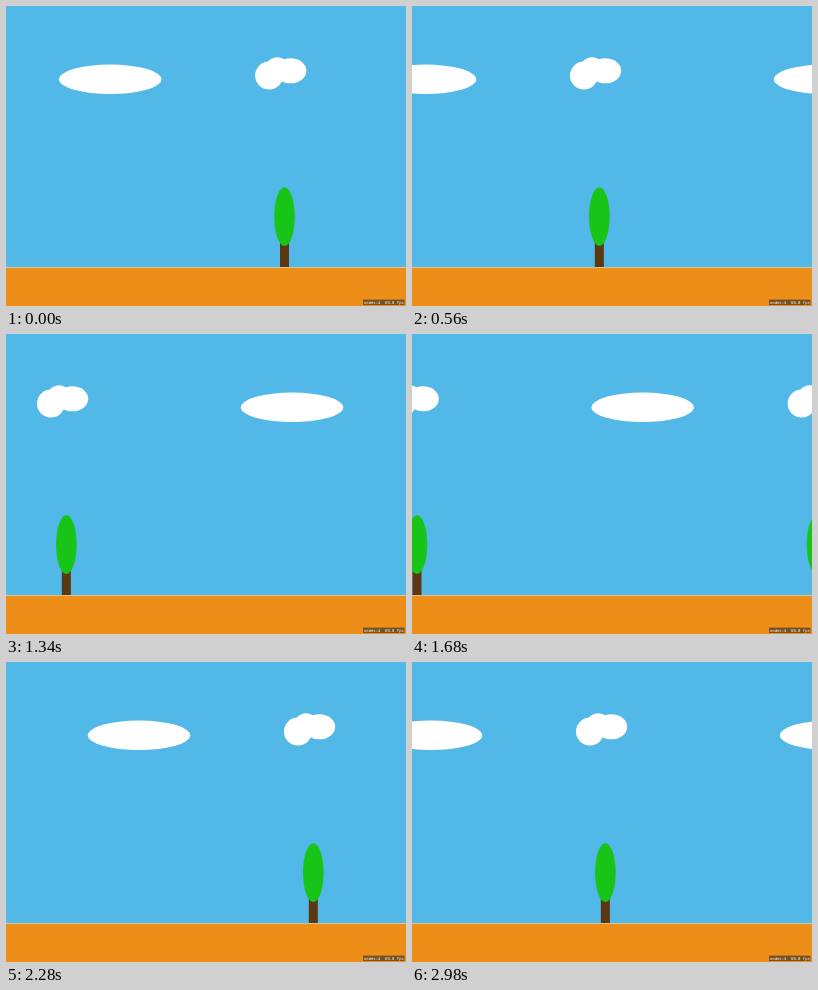
An HTML page with a canvas that plays this animation: 400 by 300 pixels, repeating every 3000 ms.

```html
<!DOCTYPE html>
<html lang="en">
<head>
<meta charset="utf-8">
<title>Scrolling landscape</title>
<style>
html, body { margin: 0; width: 100%; height: 100%; overflow: hidden; }
canvas { display: block; }
</style>
</head>
<body>
<canvas id="stage" width="400" height="300"></canvas>
<script>
const ctx = document.getElementById('stage').getContext('2d');
const W = 400, LOOP = 3000, STEP = 20;
const SPEED = 0.1628; // px per ms, leftwards

function rect(color, x, y, w, h) {
  ctx.fillStyle = color;
  ctx.fillRect(x, y, w, h);
}

function oval(color, x, y, rx, ry) {
  ctx.fillStyle = color;
  ctx.beginPath();
  ctx.ellipse(x, y, rx, ry, 0, 0, 2 * Math.PI);
  ctx.fill();
}

function scenery() {
  oval('#fff', 104.2, 73.3, 51.2, 14.8);
  oval('#fff', 263.1, 69.6, 14, 14);
  oval('#fff', 271.3, 63.3, 12, 12);
  oval('#fff', 284.5, 64.8, 15.9, 12.5);
  rect('#5b3810', 274, 232, 9, 29.5);
  oval('#19c419', 278.5, 210.6, 10.3, 29.4);
}

function status() {
  rect('rgba(40,40,40,.6)', 357, 293.6, 41.5, 5.4);
  ctx.fillStyle = '#fff';
  ctx.font = '3.9px "DejaVu Sans Mono", monospace';
  ctx.fillText('nodes:4  60.0 fps', 358, 297.7);
}

function draw(t) {
  rect('#52b8e8', 0, 0, W, 300);
  const shift = SPEED * t % W;
  for (const x of [-W, 0, W]) {
    ctx.save();
    ctx.translate(x - shift, 0);
    scenery();
    ctx.restore();
  }
  rect('#ec8e18', 0, 262, W, 38);
  rect('#d9c294', 0, 261, W, 1);
  status();
}

const start = performance.now();
function frame() {
  const t = (performance.now() - start) % LOOP;
  draw(Math.floor(t / STEP) * STEP);
  requestAnimationFrame(frame);
}
frame();
</script>
</body>
</html>
```
